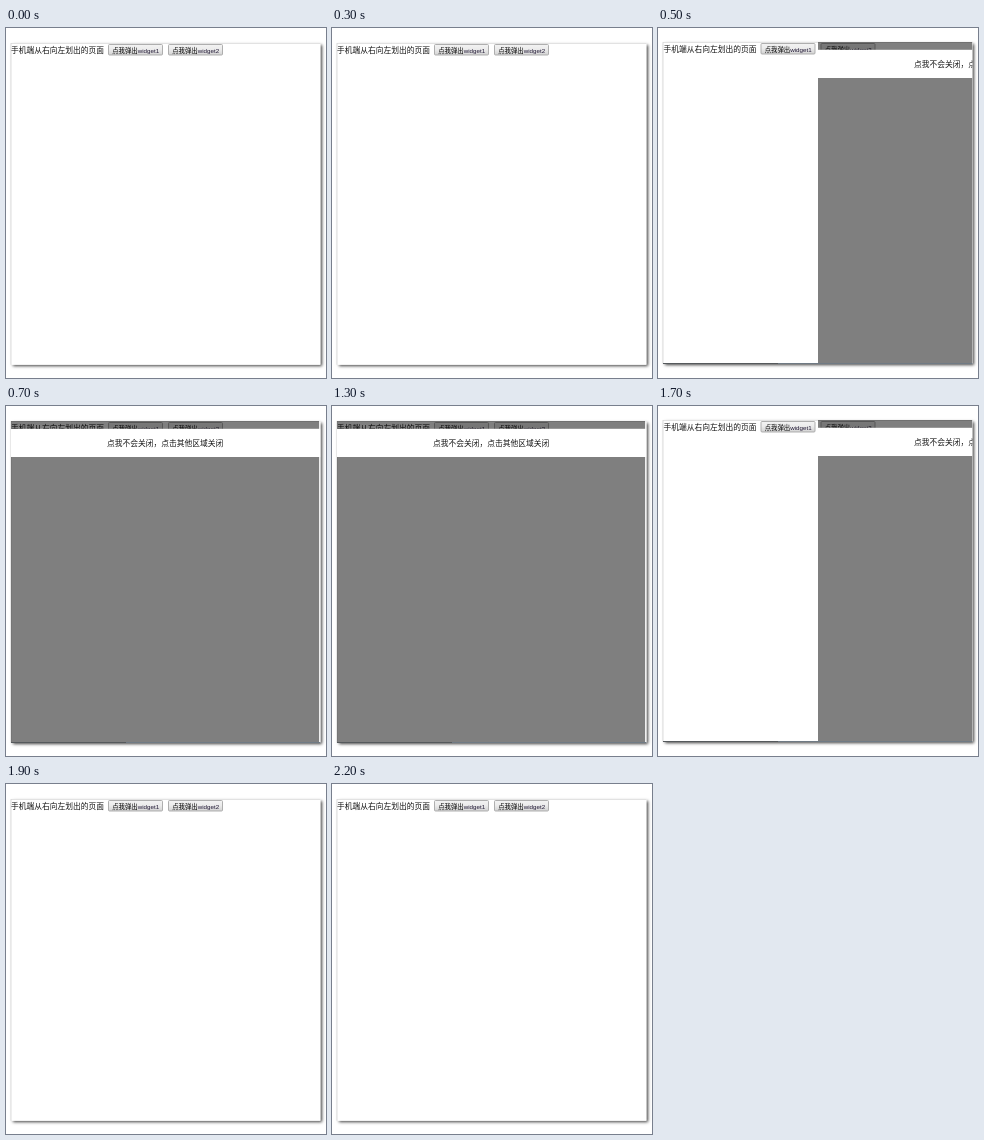
An HTML page with a canvas for the animation above (2400 ms loop, 320 by 350 pixels).

```html
<!DOCTYPE html>
<html lang="zh">
<head>
<meta charset="utf-8">
<title>Slide-in widget</title>
<style>
html, body { margin: 0; width: 100%; height: 100%; overflow: hidden; background: #fff; }
canvas { display: block; width: 320px; height: 350px; }
</style>
</head>
<body>
<canvas id="stage"></canvas>
<script>
const WIDTH = 320, HEIGHT = 350, LOOP = 2400;
const PAGE = { left: 5, top: 15, right: 314.4, bottom: 336.7 };
const SLIDE = 310;
const CJK = '"Noto Sans CJK SC", "Noto Sans CJK", sans-serif';
const LATIN = '"Liberation Sans", Arial, sans-serif';

// The widget moves in coarse steps; the whole page jitters slightly at half way.
const STEPS = [
  { until: 500, open: 0, dx: 0, dy: 0 },
  { until: 700, open: 0.5, dx: 0.5, dy: -1 },
  { until: 1700, open: 1, dx: 0, dy: 0 },
  { until: 1900, open: 0.5, dx: 0.5, dy: -1 },
  { until: LOOP, open: 0, dx: 0, dy: 0 }
];

const canvas = document.getElementById('stage');
const ctx = canvas.getContext('2d');
const scale = window.devicePixelRatio || 1;
canvas.width = WIDTH * scale;
canvas.height = HEIGHT * scale;

function box(left, top, right, bottom, fill) {
  ctx.fillStyle = fill;
  ctx.fillRect(left, top, right - left, bottom - top);
}

function text(label, x, y, size, family, color = '#141414') {
  ctx.font = `${size}px ${family}`;
  ctx.fillStyle = color;
  ctx.fillText(label, x, y);
  return x + ctx.measureText(label).width;
}

function drawSheet() {
  ctx.save();
  ctx.shadowColor = 'rgba(0, 0, 0, 0.75)';
  ctx.shadowBlur = 3 * scale;
  ctx.shadowOffsetX = 1.3 * scale;
  ctx.shadowOffsetY = 1.3 * scale;
  box(PAGE.left + 1, PAGE.top + 1, PAGE.right, PAGE.bottom, '#fff');
  ctx.restore();
  box(PAGE.left, PAGE.top, PAGE.right, PAGE.bottom, '#fff');
  box(PAGE.left, PAGE.top, PAGE.right, PAGE.top + 1, '#e2e2e2');
  box(4.6, PAGE.top, 5.4, PAGE.bottom, '#d4d4d4');
}

function drawButton(x, name) {
  const face = ctx.createLinearGradient(0, 16, 0, 27);
  face.addColorStop(0, '#f4f4f4');
  face.addColorStop(0.5, '#ebebeb');
  face.addColorStop(1, '#d2d2d2');
  ctx.beginPath();
  ctx.roundRect(x + 0.5, 16.5, 54, 10.5, 1);
  ctx.fillStyle = face;
  ctx.fill();
  ctx.lineWidth = 0.9;
  ctx.strokeStyle = '#a6a6a6';
  ctx.stroke();
  const end = text('点我弹出', x + 4.2, 24.6, 6.4, CJK, '#000');
  text(name, end, 24.5, 6.2, LATIN, '#241c38');
}

function drawContent(dx) {
  ctx.save();
  ctx.translate(dx, 0);
  text('手机端从右向左划出的页面', 5, 24.6, 7.75, CJK);
  drawButton(102, 'widget1');
  drawButton(162, 'widget2');
  ctx.restore();
}

function drawWidget(open) {
  const shift = (1 - open) * SLIDE;
  const left = PAGE.left + shift;
  const edge = Math.min(PAGE.right, 313.2 + shift);
  ctx.save();
  ctx.beginPath();
  ctx.rect(left, PAGE.top, PAGE.right - left, PAGE.bottom - PAGE.top);
  ctx.clip();
  box(left, PAGE.top, edge, PAGE.bottom, 'rgba(0, 0, 0, 0.5)');
  box(edge, PAGE.top, PAGE.right, PAGE.bottom, '#f2f2f2');
  box(left, 22.8, PAGE.right, 51, '#fff');
  text('点我不会关闭，点击其他区域关闭', 101 + shift, 40, 7.75, CJK);
  ctx.restore();
  box(PAGE.left, 336, 120, 337, '#55595c');
  box(120, 336, PAGE.right, 337, '#6f7a84');
}

function draw(now) {
  const time = now % LOOP;
  const step = STEPS.find(({ until }) => time < until);
  ctx.setTransform(scale, 0, 0, scale, 0, 0);
  box(0, 0, WIDTH, HEIGHT, '#fff');
  ctx.translate(0, step.dy);
  drawSheet();
  drawContent(step.dx);
  if (step.open) drawWidget(step.open);
}

const start = performance.now();
function tick() {
  draw(performance.now() - start);
  requestAnimationFrame(tick);
}
tick();
</script>
</body>
</html>
```
